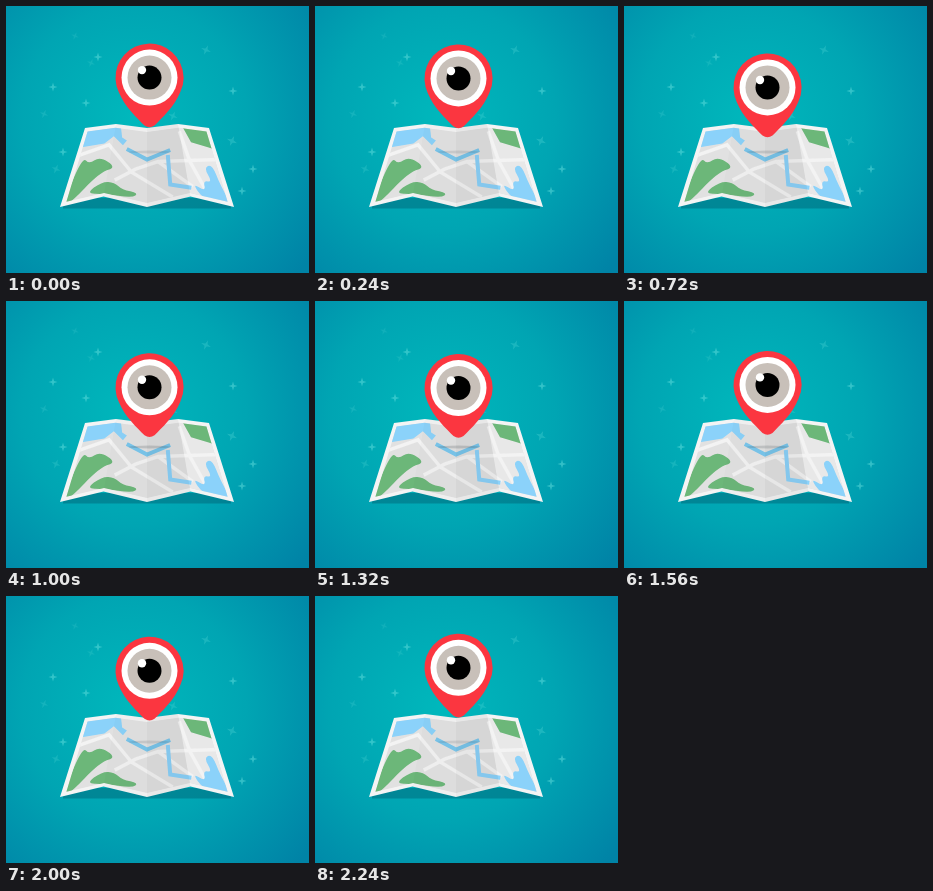
An HTML page with a canvas for the animation above (2280 ms loop, 303 px wide and 267 px high).

```html
<!DOCTYPE html>
<html lang="en">
<head>
<meta charset="utf-8">
<title>Map pin</title>
<style>
html, body { margin: 0; width: 100%; height: 100%; overflow: hidden; background: #00a2b1; }
canvas { display: block; width: 303px; height: 267px; }
</style>
</head>
<body>
<canvas id="stage" width="303" height="267"></canvas>
<script>
const W = 303, H = 267, LOOP = 2280, TAU = Math.PI * 2;
const ctx = document.getElementById('stage').getContext('2d');
const lerp = (a, b, k) => a + (b - a) * k;

// Sheet coordinates: u counts the four panels from the left, v runs from top to bottom.
function at([u, v]) {
  const fold = 1 - Math.abs(u % 2 - 1);
  return [lerp(79 + 31 * u, 54 + 43.5 * u, v), lerp(122 - 4 * fold, 201 - 10.5 * fold, v)];
}

function trace(c, points) {
  c.beginPath();
  points.forEach(p => c.lineTo(...at(p)));
}

function area(c, color, ...points) {
  trace(c, points);
  c.fillStyle = color;
  c.fill();
}

function line(c, color, width, ...points) {
  trace(c, points);
  c.strokeStyle = color;
  c.lineWidth = width;
  c.stroke();
}

// Closed curve through the midpoints between neighbouring points.
function blob(c, color, ...points) {
  const p = points.map(at), n = p.length;
  const mid = i => [0, 1].map(k => (p[i % n][k] + p[(i + 1) % n][k]) / 2);
  c.beginPath();
  c.moveTo(...mid(n - 1));
  p.forEach((q, i) => c.quadraticCurveTo(...q, ...mid(i)));
  c.fillStyle = color;
  c.fill();
}

function sheet(c, du, dv) {
  const top = [], bottom = [];
  for (let i = 0; i <= 4; i++) {
    const u = Math.min(4 - du, Math.max(du, i));
    top.push([u, dv]);
    bottom.unshift([u, 1 - dv]);
  }
  trace(c, [...top, ...bottom]);
}

function disc(c, color, x, y, r) {
  c.beginPath();
  c.arc(x, y, r, 0, TAU);
  c.fillStyle = color;
  c.fill();
}

function star(c, x, y, r, alpha, turn = 0) {
  c.beginPath();
  for (let i = 0; i < 8; i++) {
    const a = i * TAU / 8 + turn, d = i % 2 ? r * 0.32 : r;
    c.lineTo(x + Math.cos(a) * d, y + Math.sin(a) * d);
  }
  c.fillStyle = `rgba(110,228,226,${alpha})`;
  c.fill();
}

function drawBackground(c) {
  const g = c.createRadialGradient(128, 112, 0, 128, 112, 225);
  g.addColorStop(0, '#00b8bc');
  g.addColorStop(0.5, '#00a5b3');
  g.addColorStop(1, '#0083a6');
  c.fillStyle = g;
  c.fillRect(0, 0, W, H);

  const bright = [[92, 51], [47, 81], [80, 97], [57, 146], [227, 85], [247, 163], [236, 185]];
  const dim = [[69, 30], [85, 57], [38, 108], [50, 163], [167, 110], [200, 44], [226, 135]];
  bright.forEach(([x, y]) => star(c, x, y, 4.6, 0.45));
  dim.forEach(([x, y], i) => star(c, x, y, 4 + i / 4, 0.14 + i * 0.02, 0.4));
}

function drawMap(c) {
  c.fillStyle = 'rgba(0,88,108,.42)';
  c.fillRect(57, 192, 168, 10.5);
  sheet(c, 0, 0);
  c.fillStyle = '#f4f4f4';
  c.fill();

  c.save();
  sheet(c, 0.12, 0.05);
  c.clip();
  c.fillStyle = '#e1e1e1';
  c.fillRect(0, 0, W, H);
  area(c, '#e8e8e8', [3, 0], [4, 0], [4, 1], [3, 1]);

  const road = (...points) => line(c, '#f3f3f3', 3.5, ...points);
  road([0, 0.36], [0.9, 0.28], [1.6, 0.6], [2.6, 0.95]);
  road([1.2, 0.75], [1.7, 0.55], [2.3, 0.45], [4, 0.4]);
  road([3, 0.1], [3.15, 0.5], [3.5, 1]);
  road([2.3, 0.45], [3.1, 0.85]);

  const water = '#8bd2fa', park = '#6cb779';
  area(c, water, [0, 0], [1.15, 0], [1.25, 0.17], [1.4, 0.2], [1.3, 0.27], [1, 0.17], [0.75, 0.25], [0, 0.25]);
  line(c, water, 4, [2.58, 0.39], [2.57, 0.78], [3.06, 0.87]);
  blob(c, water, [3.1, 0.8], [3.4, 0.88], [3.4, 0.73], [3.63, 0.73], [3.5, 0.55], [3.76, 0.48], [3.82, 0.75], [4, 1.05], [3.3, 1]);

  blob(c, park, [0.2, 0.38], [0.45, 0.5], [0.7, 0.42], [1.2, 0.58], [0.8, 0.64], [0.2, 1], [0.05, 0.95]);
  blob(c, park, [0.55, 0.9], [0.9, 0.78], [1.2, 0.78], [1.4, 0.85], [1.8, 0.85], [1.65, 0.93], [1, 0.96]);
  area(c, park, [3.1, 0], [4, 0], [4, 0.28], [3.8, 0.26], [3.3, 0.23]);
  c.restore();

  line(c, '#79c6ec', 4, [1.42, 0.31], [2, 0.4], [2.66, 0.33]);
  area(c, 'rgba(0,0,0,.02)', [1, 0], [2, 0], [2, 1], [1, 1]);
  area(c, 'rgba(0,0,0,.05)', [2, 0], [3, 0], [3, 1], [2, 1]);
}

function drawPin(c, top) {
  const x = 143.5, y = top + 34, a = Math.PI * 0.14;
  c.beginPath();
  c.arc(x, y, 34, Math.PI - a, a);
  c.bezierCurveTo(x + 25, y + 29, x + 12, y + 41, x + 5, y + 48);
  c.quadraticCurveTo(x, y + 51.5, x - 5, y + 48);
  c.bezierCurveTo(x - 12, y + 41, x - 25, y + 29, x - 34 * Math.cos(a), y + 34 * Math.sin(a));
  c.fillStyle = '#fb3640';
  c.fill();
  disc(c, '#ffffff', x, y, 28);
  disc(c, '#c8c0b9', x, y, 22);
  disc(c, '#000000', x, y, 12);
  disc(c, '#ffffff', x - 7.5, y - 7.5, 4.2);
}

const scene = document.createElement('canvas');
scene.width = W;
scene.height = H;
const back = scene.getContext('2d');
drawBackground(back);
drawMap(back);

function draw(now) {
  const drop = (1 - Math.cos((now - 62) / LOOP * TAU)) / 2;
  ctx.drawImage(scene, 0, 0);
  ctx.beginPath();
  ctx.ellipse(143.5, 146, 21, 1.5, 0, 0, TAU);
  ctx.fillStyle = `rgba(70,80,85,${0.14 + 0.08 * drop})`;
  ctx.fill();
  drawPin(ctx, 37.5 + 16 * drop);
}

const start = performance.now();
function tick() {
  draw((performance.now() - start) % LOOP);
  requestAnimationFrame(tick);
}
tick();
</script>
</body>
</html>
```
